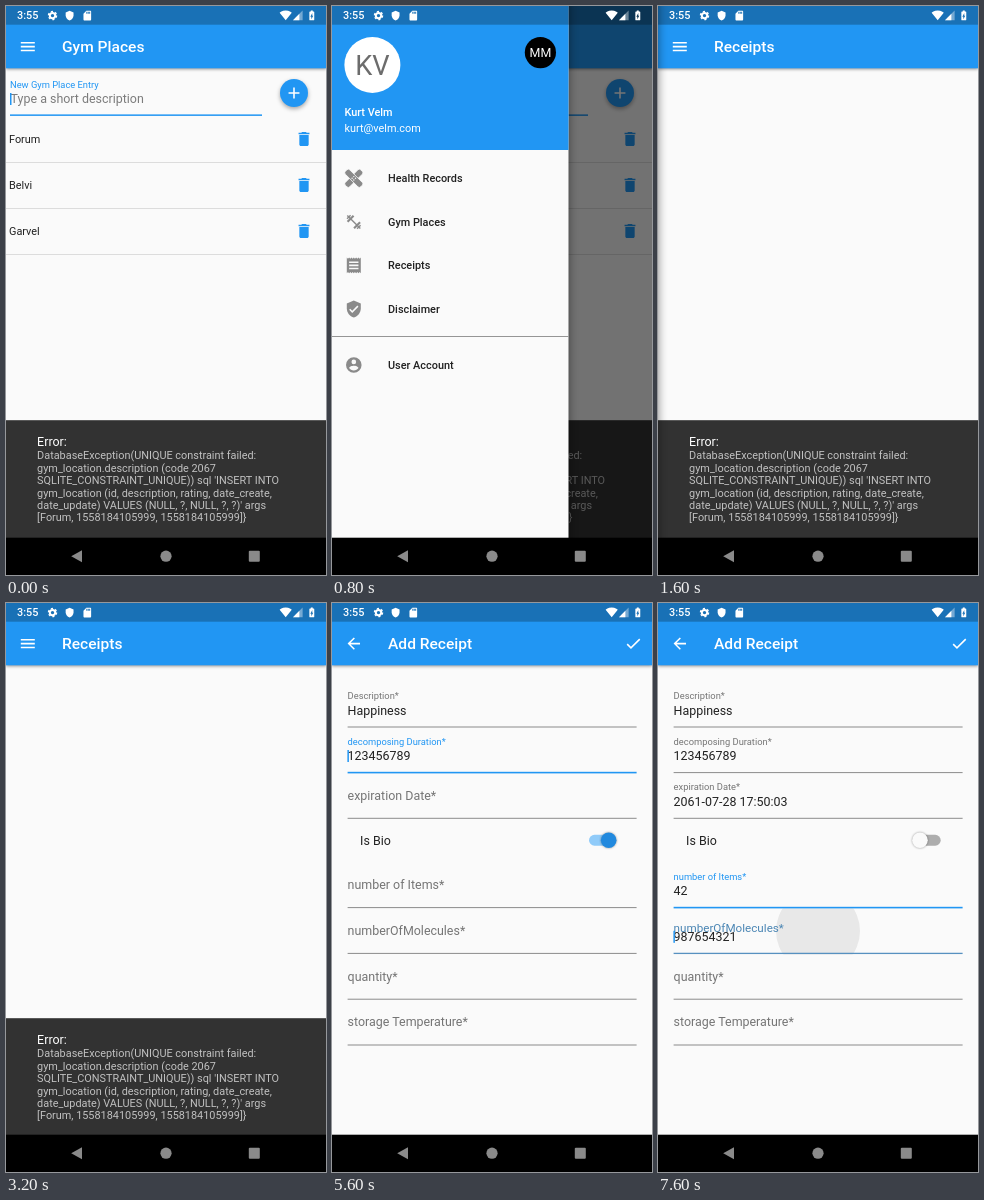
An HTML page that plays this animation: 320 px wide and 569 px high, repeating every 8000 ms.

```html
<!DOCTYPE html>
<html lang="en">
<head>
<meta charset="utf-8">
<title>Gym app</title>
<style>
html, body { margin: 0; width: 100%; height: 100%; overflow: hidden; background: #000 }
svg { display: block; width: 100%; height: 100%; font-family: Roboto, sans-serif }
.bar { filter: drop-shadow(0 1px 1.6px #0006) }
.fab { filter: drop-shadow(0 2px 2px #0005) }
.thumb { filter: drop-shadow(0 .8px .8px #0006) }
.drawer { filter: drop-shadow(0 4px 5px #0007) }
</style>
</head>
<body>
<svg id="stage" viewBox="0 0 320 569"></svg>
<script>
const STEP = 400, STEPS = 20;
const DP = 7 / 9; // pixels per density-independent unit
const BLUE = '#2196f3', INK = '#212121', PAPER = '#fafafa', DIM = '#757575';
const BIG = 16 * DP, MID = 14 * DP, SMALL = 12 * DP;

// Icons on a 24 x 24 grid
const ICON = {
  menu: 'M3 18h18v-2H3zM3 13h18v-2H3zM3 6v2h18V6z',
  back: 'M20 11H7.83l5.59-5.59L12 4l-8 8 8 8 1.41-1.41L7.83 13H20z',
  check: 'M9 16.17L4.83 12l-1.42 1.41L9 19 21 7l-1.41-1.41z',
  add: 'M19 13h-6v6h-2v-6H5v-2h6V5h2v6h6z',
  trash: 'M6 19c0 1.1.9 2 2 2h8c1.1 0 2-.9 2-2V7H6zM19 4h-3.5l-1-1h-5l-1 1H5v2h14z',
  shield: 'M12 1L3 5v6c0 5.55 3.84 10.74 9 12 5.16-1.26 9-6.45 9-12V5z',
  tick: 'M10 17l-4-4 1.41-1.41L10 14.17l6.59-6.59L18 9z',
  card: 'M18 2h-8L4 8v12c0 1.1.9 2 2 2h12c1.1 0 2-.9 2-2V4c0-1.1-.9-2-2-2zM12 8h-2V4h2zM15 8h-2V4h2zM18 8h-2V4h2z',
  wifi: 'M12 21.5L23.64 7C23.2 6.66 18.7 3 12 3S.8 6.66.36 7z',
  battery: 'M15.67 4H14V2h-4v2H8.33C7.6 4 7 4.6 7 5.33v15.34C7 21.4 7.6 22 8.33 22h7.34c.73 0 1.33-.6 1.33-1.33V5.33C17 4.6 16.4 4 15.67 4zM11 20v-5.5H9L13 7v5.5h2z',
  receipt: 'M18 17H6v-2h12zM18 13H6v-2h12zM18 9H6V7h12zM3 22' + 'l1.5-1.5 1.5 1.5'.repeat(6) + 'V2' + 'l-1.5 1.5-1.5-1.5'.repeat(6) + 'z',
  person: 'M12 2a10 10 0 100 20 10 10 0 000-20zM12 5a3 3 0 110 6 3 3 0 010-6zM12 19.2c-2.5 0-4.7-1.3-6-3.2 0-2 4-3.1 6-3.1s6 1.1 6 3.1c-1.3 1.9-3.5 3.2-6 3.2z'
};

const lerp = (a, b, t) => a + (b - a) * t;
const mix = (grey, t) => `rgb(${[33, 150, 243].map(c => Math.round(lerp(grey, c, t)))})`;
const text = (x, y, s, size, fill, more = '') =>
  `<text x="${x}" y="${y}" font-size="${size}" fill="${fill}" ${more}>${s}</text>`;
const medium = (x, y, s, size, fill) => text(x, y, s, size, fill, 'font-weight="500"');
const centred = (x, y, s, size, fill) => text(x, y, s, size, fill, 'text-anchor="middle"');
const rect = (x, y, w, h, fill, more = '') =>
  `<rect x="${x}" y="${y}" width="${w}" height="${h}" fill="${fill}" ${more}/>`;
const circle = (x, y, r, fill, more = '') =>
  `<circle cx="${x}" cy="${y}" r="${r}" fill="${fill}" ${more}/>`;
const group = (attrs, s) => `<g ${attrs}>${s}</g>`;
const at = (x, y, s, size = 24 * DP) =>
  group(`transform="translate(${x} ${y}) scale(${size / 24}) translate(-12 -12)"`, s);
const icon = (name, x, y, fill, size) =>
  at(x, y, `<path d="${ICON[name]}" fill="${fill}" fill-rule="evenodd"/>`, size);

const page = (title, lead, body) =>
  rect(0, 0, 320, 569, PAPER) + body +
  rect(0, -3, 320, 65.3, BLUE, 'class="bar"') +
  icon(lead, 21.8, 40.6, '#fff') + medium(56, 46.4, title, 20 * DP, '#fff');

const fab = (x, y, r) => circle(x, y, r, BLUE, 'class="fab"') + icon('add', x, y, '#fff');

function gymPage() {
  const rows = ['Forum', 'Belvi', 'Garvel'].map((name, i) => {
    const y = 133 + 46 * i;
    return text(3, y + 4, name, MID, INK) + icon('trash', 298, y, BLUE) +
      rect(0, y + 23, 320, 1, '#dcdcdc');
  }).join('');
  return page('Gym Places', 'menu',
    text(4, 81.8, 'New Gym Place Entry', SMALL, BLUE) +
    text(4.6, 97.4, 'Type a short description', BIG, '#7c7c7c') +
    rect(4, 87, 1.5, 12, BLUE) + rect(4, 108.4, 252, 1.5, BLUE) +
    fab(288, 87, 14) + rows);
}

const receiptsPage = () => page('Receipts', 'menu', fab(285.6, 497.3, 21.8));

// Each field: label, underline y, value, first step, then [lift, focus, cursor] per step
const FIELDS = [
  ['Description*', 124, 'Happiness', 13, [1, 1, 0], [1, 0, 0]],
  ['decomposing Duration*', 169.6, '123456789', 13, [.1, 0, 1], [1, 1, 1], [1, .5, 0], [1, 0, 0]],
  ['expiration Date*', 215.3, '2061-07-28 17:50:03', 15, [.25, .5, 1], [.9, 1, 1], [1, 1, 1], [1, .15, 0], [1, 0, 0]],
  ['number of Items*', 304.6, '42', 18, [1, 1, 0]],
  ['numberOfMolecules*', 350.4, '987654321', 19, [.25, .5, 1]],
  ['quantity*', 396.2, '', STEPS],
  ['storage Temperature*', 442, '', STEPS]
];

function field([label, y, value, start, ...keys], step) {
  const on = step >= start;
  const [lift, focus, cursor] = on ? keys[Math.min(step - start, keys.length - 1)] : [0, 0, 0];
  const thick = lerp(1, 1.6, focus);
  return rect(15.6, y - thick / 2, 289, thick, mix(140, focus)) +
    text(15.6, lerp(y - 18.6, y - 28, lift), label, BIG * lerp(1, .75, lift), mix(117, focus)) +
    (on ? text(15.6, y - 12.2, value, BIG, INK) : '') +
    (cursor ? rect(15.4, y - 22.6, 1.5, 12, BLUE) : '');
}

function toggle(t) {
  return rect(257, 231.8, 25.7, 10.9, t > .5 ? '#90cbf9' : '#adadad', 'rx="5.45"') +
    circle(lerp(262, 276.7, t), 237.3, 7.8, t > .5 ? '#2189de' : PAPER, 'class="thumb"');
}

function formPage(step) {
  const ripple = step == 19
    ? '<clipPath id="row"><path d="M0 305.5h320v46H0z"/></clipPath>' +
      circle(160, 328, 42, '#e8e8e8', 'clip-path="url(#row)"') : '';
  return page('Add Receipt', 'back', ripple +
    FIELDS.map(f => field(f, step)).join('') +
    text(28, 241.6, 'Is Bio', BIG, INK) +
    toggle(step < 17 ? 1 : step == 17 ? .5 : 0)) +
    icon('check', 301.3, 40.6, '#fff');
}

const ERROR = [
  'DatabaseException(UNIQUE constraint failed:',
  'gym_location.description (code 2067',
  "SQLITE_CONSTRAINT_UNIQUE)) sql 'INSERT INTO",
  'gym_location (id, description, rating, date_create,',
  "date_update) VALUES (NULL, ?, NULL, ?, ?)' args",
  '[Forum, 1558184105999, 1558184105999]}'
];
const snackbar = y => rect(0, y, 320, 155, '#323232') +
  text(31.1, y + 26, 'Error:', BIG, '#fff') +
  ERROR.map((s, i) => text(31.1, y + 39.2 + 12.4 * i, s, MID, '#c1c1c1')).join('');

const GREY = '#8a8a8a';
const strip = rect(-2, 8, 28, 8, GREY, `rx="2.5" stroke="${PAPER}"`);
const dots = [[12, 9.8], [12, 14.2], [9.8, 12], [14.2, 12]].map(p => circle(...p, .9, PAPER)).join('');
const bandage = group('transform="rotate(-45 12 12)"', strip) +
  group('transform="rotate(45 12 12)"', strip) + dots;
const dumbbell = group('transform="rotate(45 12 12)"',
  [[-1, 11, 26, 2], [1, 8.5, 2, 7], [4, 6, 3, 12], [17, 6, 3, 12], [21, 8.5, 2, 7]]
    .map(r => rect(...r, GREY)).join(''));

function drawer(open) {
  const items = [['Health Records', 172.3], ['Gym Places', 216], ['Receipts', 259.4],
    ['Disclaimer', 303], ['User Account', 359]];
  const art = [y => at(21.8, y, bandage), y => at(21.8, y, dumbbell, 17),
    y => icon('receipt', 21.8, y, GREY),
    y => icon('shield', 21.8, y, GREY) + icon('tick', 21.8, y, PAPER),
    y => icon('person', 21.8, y, GREY)];
  return rect(0, 0, 320, 569, '#000', `opacity="${.54 * open}"`) +
    group(`transform="translate(${236.5 * (open - 1)})"`,
      rect(0, -20, 236.5, 600, PAPER, 'class="drawer"') +
      rect(0, 0, 236.5, 144, BLUE) +
      circle(40.4, 59, 28, '#fff') + centred(40.4, 69, 'KV', 35 * DP, '#6c6c6c') +
      circle(208.4, 46.6, 15.6, '#000') + centred(208.4, 51, 'MM', BIG, '#fff') +
      medium(12.5, 110.4, 'Kurt Velm', MID, '#fff') +
      text(12.5, 126, 'kurt@velm.com', MID, '#fff') +
      items.map(([s, y], i) => art[i](y) + medium(56, y + 3.9, s, MID, INK)).join('') +
      rect(0, 330, 236.5, 1, '#959595'));
}

const system =
  rect(0, 0, 320, 18.7, '#000', 'opacity=".25"') +
  medium(11, 13.4, '3:55', MID, '#fff') +
  '<g fill="none" stroke="#fff"><circle cx="46.5" cy="9.6" r="2.7" stroke-width="2"/>' +
  '<circle cx="46.5" cy="9.6" r="4.1" stroke-width="1.3" stroke-dasharray="2.15"/></g>' +
  icon('shield', 63.6, 9.6, '#fff', 10.5) + icon('card', 81.3, 9.6, '#fff', 11.5) +
  icon('wifi', 279.7, 9.3, '#fff', 12.5) +
  '<path d="M287 14.2h9.6V4.6z" fill="#fff" opacity=".4"/><path d="M287 14.2h6.4V7.8z" fill="#fff"/>' +
  icon('battery', 305.8, 9.4, '#fff', 11.8) +
  rect(0, 531.7, 320, 38, '#000') +
  `<path d="M65.2 550.2L76 544.2v12z" fill="${GREY}"/>` +
  circle(160, 550.2, 5.6, GREY) + rect(242.8, 544.7, 11, 11, GREY, 'rx="1"');

const OPEN = { 1: .55, 2: 1, 3: .5, 4: 0, 5: 0, 6: 0, 7: 0 };

function scene(step) {
  let s = step < 3 ? gymPage() : step < 12 ? receiptsPage() : formPage(step);
  if (step < 10) s += snackbar(step < 8 ? 414.2 : step == 8 ? 415.2 : 518.5);
  if (step == 11) s += group('opacity=".78" transform="translate(0 1.9)"', formPage(step));
  if (step in OPEN) s += drawer(OPEN[step]);
  return s + system;
}

const stage = document.getElementById('stage');
let shown = -1;
function tick() {
  const step = Math.floor(performance.now() / STEP) % STEPS;
  if (step != shown) stage.innerHTML = scene(shown = step);
  requestAnimationFrame(tick);
}
tick();
</script>
</body>
</html>
```
